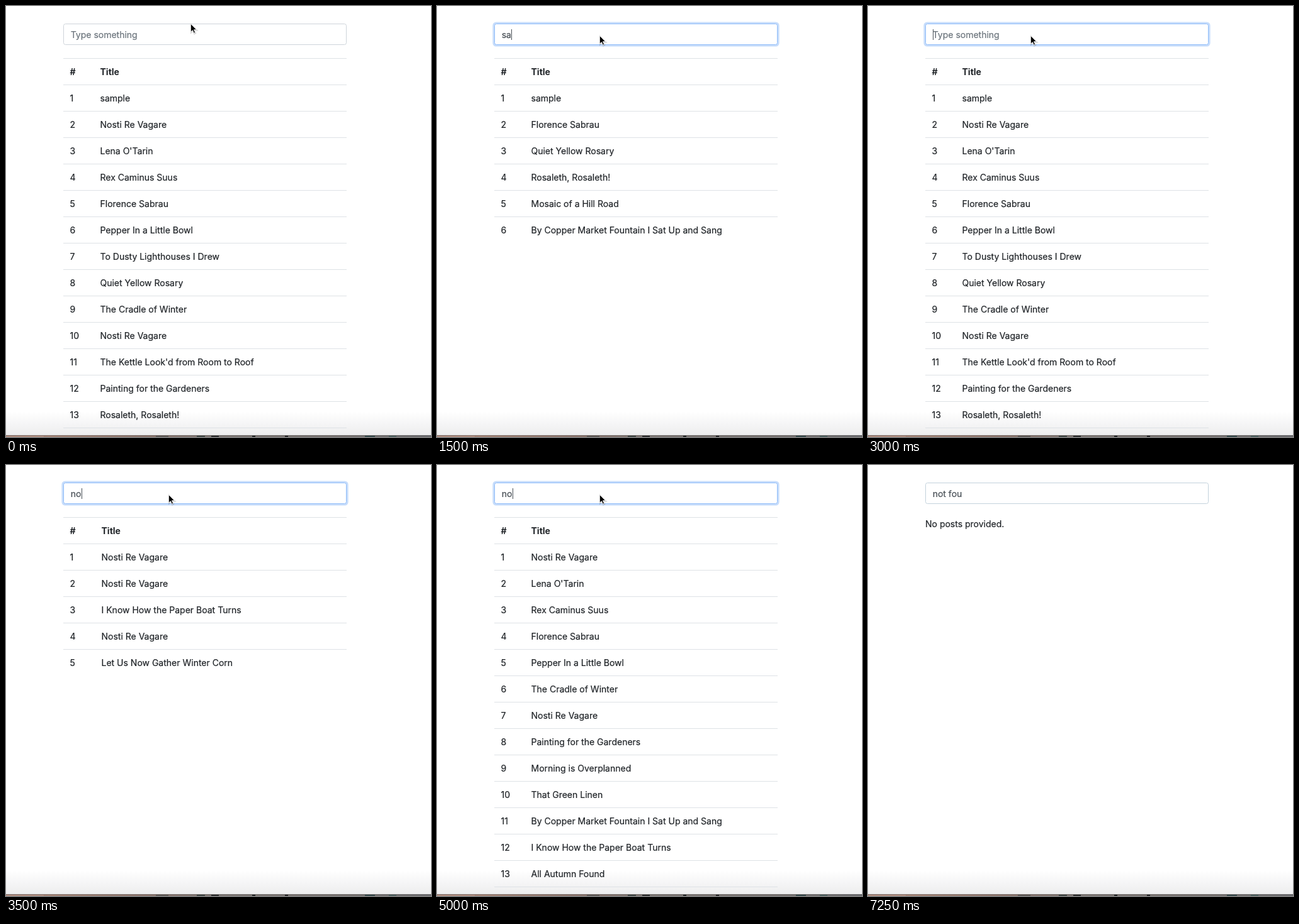
An HTML page that plays this animation: 675 by 686 pixels, repeating every 7.5 s.

```html
<!DOCTYPE html>
<html lang="en">
<head>
<meta charset="utf-8">
<title>Live search</title>
<style>
  html, body { margin: 0; width: 100%; height: 100%; overflow: hidden; background: #fff; }
  svg { display: block; width: 100%; height: 100%; }
  text {
    font: 14px Inter, "Liberation Sans", sans-serif; white-space: pre;
    color: #212529; fill: currentColor; stroke: currentColor; stroke-width: .22px;
  }
  .head { font-weight: 700; stroke: none; }
  #query { color: #495057; }
  #query.hint { color: #6c757d; }
  #query.picked { color: #111; }
</style>
</head>
<body>
<svg viewBox="0 0 675 686">
  <defs>
    <linearGradient id="shade" x2="0" y2="1">
      <stop offset="0" stop-color="#fff"/>
      <stop offset="1" stop-color="#ededee"/>
    </linearGradient>
    <linearGradient id="photo">
      <stop offset="0" stop-color="#8a6a60"/>
      <stop offset=".1" stop-color="#a58476"/>
      <stop offset=".34" stop-color="#8a736b"/>
      <stop offset=".5" stop-color="#7d7673"/>
      <stop offset=".8" stop-color="#77716f"/>
      <stop offset="1" stop-color="#6b6b6e"/>
    </linearGradient>
  </defs>
  <rect width="675" height="686" fill="#fff"/>
  <rect y="645" width="675" height="38" fill="url(#shade)"/>
  <g id="list"></g>
  <g id="strip"><rect y="683" width="675" height="3" fill="url(#photo)"/></g>
  <rect id="ring" x="88.4" y="25.4" width="455.2" height="39.2" rx="5.5" fill="#c7ddfb"/>
  <rect id="field" x="91.5" y="28.5" width="449" height="33" rx="3" fill="#fff"/>
  <rect id="mark" x="103" y="37" height="17" fill="#b4d5fe"/>
  <text id="query" x="102.7" y="51"></text>
  <rect id="caret" y="37" width="1" height="17" fill="#495057"/>
  <g id="pointer">
    <path d="M0 0V13.2L3.1 10.4L5.1 15L7.3 14L5.3 9.5H9.4Z" transform="translate(.6 1)"
      fill="none" stroke="#000" stroke-opacity=".16" stroke-width="2"/>
    <path d="M0 0V13.2L3.1 10.4L5.1 15L7.3 14L5.3 9.5H9.4Z" fill="#000" stroke="#fff" stroke-width=".9"/>
  </g>
</svg>
<script>
const LOOP = 7500, ROW = 42, LEFT = 91, RIGHT = 541, TEXT_X = 103;

const posts = [
  "sample", "Nosti Re Vagare", "Lena O'Tarin", "Rex Caminus Suus", "Florence Sabrau",
  "Pepper In a Little Bowl", "To Dusty Lighthouses I Drew", "Quiet Yellow Rosary",
  "The Cradle of Winter", "Nosti Re Vagare", "The Kettle Look'd from Room to Roof",
  "Painting for the Gardeners", "Rosaleth, Rosaleth!", "Mosaic of a Hill Road",
  "Morning is Overplanned", "That Green Linen", "By Copper Market Fountain I Sat Up and Sang",
  "I Know How the Paper Boat Turns", "All Autumn Found", "Nosti Re Vagare",
  "Let Us Now Gather Winter Corn"
];

// Each step overrides part of the state from its start time on.
const steps = [
  [0, { text: "", filter: "", focus: false, caret: false, picked: false, pointer: [293.3, 28.3], border: "#ced4da" }],
  [250, { pointer: [264, 42.5] }],
  [500, { pointer: [258.3, 47.2] }],
  [750, { focus: true, caret: true, border: "#8fbcf9" }],
  [1250, { caret: false }],
  [1500, { text: "sa", filter: "sa", caret: true }],
  [1750, { text: "samp", filter: "samp" }],
  [2000, { text: "sample", filter: "sample" }],
  [2500, { picked: true, caret: false }],
  [3000, { text: "", filter: "", picked: false, caret: true }],
  [3250, { text: "no", filter: "n" }],
  [3500, { filter: "no" }],
  [3750, { text: "no " }],
  [4000, { text: "no  ", filter: "no " }],
  [4250, { picked: true, caret: false }],
  [5000, { text: "no", filter: "n", picked: false, caret: true }],
  [5250, { text: "not", filter: "not" }],
  [5500, { text: "not " }],
  [5750, { text: "not fo" }],
  [6000, { text: "not fou" }],
  [6500, { caret: false }],
  [6750, { pointer: null }],
  [7000, { caret: true }],
  [7250, { focus: false, caret: false, border: "#c3d2dc" }]
];

const el = id => document.getElementById(id);
const set = (node, attrs) => { for (const k in attrs) node.setAttribute(k, attrs[k]); };
const show = (node, on) => set(node, { visibility: on ? "visible" : "hidden" });
const label = (x, y, s, cls = "") => `<text x="${x}" y="${y}" class="${cls}">${s}</text>`;

function titleX(filter) {
  if (filter.startsWith("samp")) return 239.5;
  return filter === "no" ? 151.5 : 149.5;
}

function listMarkup(filter) {
  const found = posts.filter(p => p.toLowerCase().includes(filter));
  if (!found.length) return label(LEFT, 99, "No posts provided.");
  const x = titleX(filter);
  return ["Title", ...found.slice(0, 14)].map((title, i) => {
    const y = 83 + i * ROW, cls = i ? "" : "head";
    return `<rect x="${LEFT}" y="${y}" width="${RIGHT - LEFT}" height="1" fill="#dee2e6"/>` +
      label(101.5, y + 27, i || "#", cls) + label(x, y + 27, title, cls);
  }).join("");
}

function drawStrip() {
  const spots = [
    [0, 60, "#b08d80"], [238, 20, "#5d5855"], [303, 13, "#3f4644"], [326, 12, "#2b2c2d"],
    [391, 5, "#222526"], [443, 5, "#262628"], [570, 16, "#35494b"], [608, 12, "#4c5f5e"]
  ];
  el("strip").innerHTML += spots.map(([x, w, c]) =>
    `<rect x="${x}" y="684" width="${w}" height="2" fill="${c}"/>`).join("") +
    `<rect y="683" width="675" height="1" fill="#666" opacity=".5"/>`;
}

function render(s) {
  const query = el("query");
  el("list").innerHTML = listMarkup(s.filter);
  query.textContent = s.text || "Type something";
  set(query, { class: s.picked ? "picked" : s.text ? "" : "hint" });
  const width = s.text ? query.getComputedTextLength() : 0;
  set(el("mark"), { width });
  show(el("mark"), s.picked);
  set(el("caret"), { x: Math.floor(TEXT_X + width + 0.35) });
  show(el("caret"), s.caret);
  set(el("field"), { stroke: s.border });
  show(el("ring"), s.focus);
  show(el("pointer"), s.pointer);
  if (s.pointer) set(el("pointer"), { transform: `translate(${s.pointer})` });
}

let shown = -1;
function update(t) {
  const count = steps.filter(([at]) => at <= t).length;
  if (count === shown) return;
  shown = count;
  render(Object.assign({}, ...steps.slice(0, count).map(step => step[1])));
}

const start = performance.now();
function tick() {
  update((performance.now() - start) % LOOP);
  requestAnimationFrame(tick);
}

drawStrip();
update(0);
tick();
</script>
</body>
</html>
```
